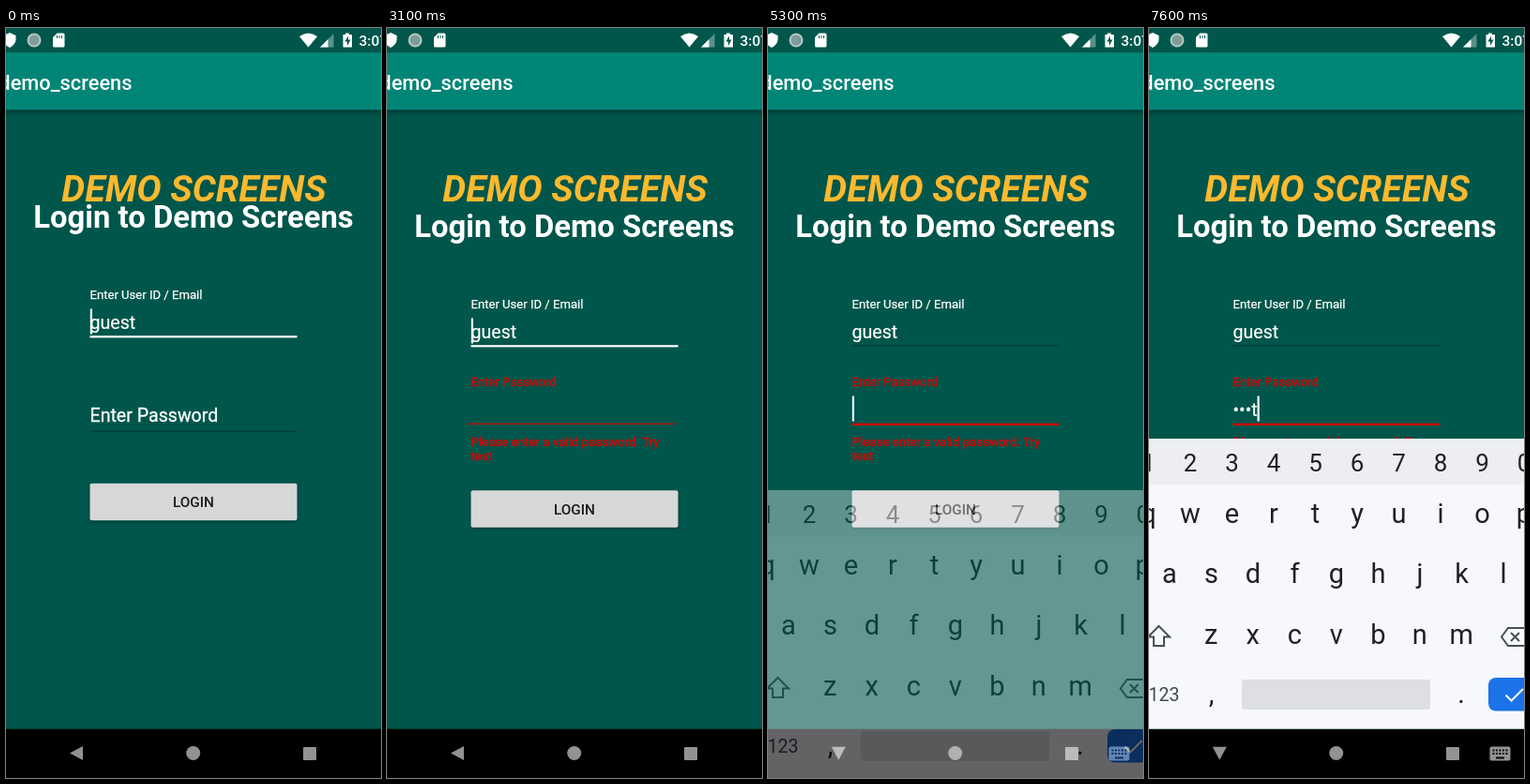
These frames come from a looping animation (400 px wide and 800 px high, 8 s). An HTML page:

```html
<!DOCTYPE html>
<html lang="en">
<head>
<meta charset="utf-8">
<title>Login form</title>
<style>
  html, body { margin: 0; width: 100%; height: 100%; overflow: hidden; background: #00564b; }
  svg { display: block; width: 400px; height: 800px; font-family: Roboto, sans-serif; }
  text { fill: #fff; white-space: pre; }
  .mid { text-anchor: middle; }
  .label { font-size: 13.1px; stroke: #fff; stroke-width: .25px; }
  .input { font-size: 19.6px; stroke: #fff; stroke-width: .2px; }
  .error { font-size: 13.3px; fill: #d80606; stroke: #d80606; stroke-width: .4px; }
  #keys text { fill: #202124; text-anchor: middle; font-size: 29px; }
  #keys .digit { font-size: 26px; }
  #keys .mode { font-size: 19.5px; fill: #444a50; text-anchor: end; }
</style>
</head>
<body>
<svg viewBox="0 0 400 800">
  <defs>
    <linearGradient id="shade" x1="0" y1="0" x2="0" y2="1">
      <stop offset="0" stop-opacity=".28"/><stop offset="1" stop-opacity="0"/>
    </linearGradient>
    <clipPath id="btnClip"><rect x="89.500" y="485.700" width="221" height="39.500" rx="2"/></clipPath>
  </defs>

  <rect width="400" height="800" fill="#00564b"/>
  <rect y="26.200" width="400" height="61.100" fill="#008577"/>
  <rect y="87.300" width="400" height="8" fill="url(#shade)"/>

  <!-- status bar -->
  <g fill="#fff">
    <path d="M-3 8 4 5 10.500 8V12.500Q10 18 4 21-2 18-3 12.500Z"/>
    <circle cx="30" cy="13" r="6.500" fill="#7f9d98" stroke="#b4c6c3" stroke-width="2"/>
    <path d="M54.500 5.500H61Q62.500 5.500 62.500 7V19Q62.500 20.500 61 20.500H51.500Q50 20.500 50 19V10Z"/>
    <path d="M54.500 8v3M57 8v3M59.500 8v3" stroke="#00564b"/>
    <path d="M313 9Q322.500 2 332 9L322.500 20.500Z"/>
    <path d="M335 20.500 349.500 6V20.500Z" opacity=".35"/>
    <path d="M335 20.500 343.500 12V20.500Z"/>
    <path d="M362 5.500h4V7h3V20.500H359.500V7H362Z"/>
    <path d="M365 8.500 361.500 14.500H364V19L367.500 12.500H365Z" fill="#00564b"/>
  </g>
  <text x="376.500" y="19" font-size="15.500" font-weight="500">3:07</text>
  <text x="134.500" y="65.500" font-size="21.800" font-weight="500" text-anchor="end">demo_screens</text>

  <text class="mid" x="200.500" y="184.500" font-size="39.400" font-weight="700" font-style="italic" style="fill:#fdb92e">DEMO SCREENS</text>

  <g id="upper">
    <text class="mid" x="200" y="212.500" font-size="32.800" font-weight="700">Login to Demo Screens</text>
    <text class="label" x="89.500" y="289">Enter User ID / Email</text>
    <text class="input" x="89.500" y="321">guest</text>
    <rect id="userLine" x="89.500" width="221"/>
    <rect id="userCaret" x="89.800" y="299.500" width="2.200" height="27" fill="#fff"/>
  </g>

  <text id="hint" x="89.500" stroke-width=".3">Enter Password</text>
  <g id="field">
    <rect id="passLine" x="89.500" width="221"/>
    <text id="pass" class="input" x="89.500" y="414"></text>
    <rect id="passCaret" y="392.500" width="2.200" height="27" fill="#fff"/>
  </g>
  <g id="error">
    <text class="error" x="89.500" y="445.500">Please enter a valid password. Try</text>
    <text class="error" x="89.500" y="461">test</text>
  </g>

  <g id="button">
    <rect id="btnFace" x="89.500" y="485.700" width="221" height="39.500" rx="2" fill="#d6d7d7"/>
    <g id="ripple" clip-path="url(#btnClip)">
      <rect x="89" y="485" width="222" height="41" fill-opacity=".045"/>
      <circle id="wave" cx="165" cy="499" fill="#304048" fill-opacity=".075"/>
    </g>
    <text class="mid" x="200" y="511" font-size="15.300" font-weight="500" style="fill:#1c1c1c">LOGIN</text>
  </g>

  <!-- navigation bar -->
  <rect y="747.700" width="400" height="53"/>
  <g fill="#929292">
    <path id="back" d="M68 773.500 82 766V781Z"/>
    <circle cx="199.700" cy="773.500" r="7.500"/>
    <rect x="317" y="767" width="14" height="14" rx="1"/>
    <g id="imeIcon">
      <rect x="363.500" y="766.500" width="22" height="15" rx="2"/>
      <path d="M366.500 770.500H383M366.500 774H383" stroke="#000" stroke-width="2" stroke-dasharray="2 1.500"/>
      <path d="M370 778.500h9" stroke="#000" stroke-width="2"/>
    </g>
  </g>

  <g id="keyboard">
    <rect y="438" width="400" height="309.700" fill="#f7f8fc"/>
    <rect y="438" width="400" height="49" fill="#eceef1"/>
    <rect x="99" y="695" width="201" height="32" rx="3" fill="#dddfe2"/>
    <rect x="362" y="693" width="60" height="35.500" rx="8" fill="#1a73e8"/>
    <g id="keys"><text class="mode" x="32.500" y="718">?123</text></g>
    <g fill="none" stroke="#4a4e53" stroke-width="2">
      <path d="M10.500 638 22 649.500H16V659H5V649.500H-1Z"/>
      <path d="M376 649.500 383 640H406V659H383ZM386 645l9 9M395 645l-9 9"/>
      <path d="M380.500 711.500 386.500 717.500 399 705" stroke="#fff"/>
    </g>
  </g>
</svg>
<script>
const LOOP = 8000, STEP = 100;
const SHIFT = 1958;                    // error shows and the form re-lays out
const SHAKE = { from: 2680, to: 3980, cycles: 5, size: 5.5 };
const FOCUS = 5000;                    // password field takes focus
const RED = '#d80606', DARK = '#003b34';

const $ = id => document.getElementById(id);
const clamp = v => Math.min(1, Math.max(0, v));
const mix = (a, b, p) => a + (b - a) * p;
const set = (id, attrs) => {
  for (const k in attrs) $(id).setAttribute(k, attrs[k]);
};
const show = (id, on) => set(id, { visibility: on ? 'visible' : 'hidden' });
const move = (id, x, y) => set(id, { transform: `translate(${x} ${y})` });
const within = (t, spans) => spans.some(([a, b]) => t >= a && t < b);

const userOn = [[0, 500], [1100, 1600], [2000, 2500], [3000, 3600], [4000, 4700]];
const passOn = [[FOCUS, 6100], [6600, LOOP]];
const typed = [[7600, '•••t'], [7400, '••s'], [7300, '•e'], [7200, 't']];
const keyboard = { 5300: [0.4, 55], 5400: [0.83, 15.5] };  // opacity, drop

const rows = [
  ['1234567890', -0.5, 473, 'digit'],
  ['qwertyuiop', -0.5, 528, ''],
  ['asdfghjkl', 22, 592, ''],
  ['zxcvbnm', 66.3, 657, '']
];
function addKey(ch, x, y, cls) {
  const key = document.createElementNS($('keys').namespaceURI, 'text');
  key.textContent = ch;
  key.setAttribute('x', x);
  key.setAttribute('y', y);
  key.setAttribute('class', cls);
  $('keys').append(key);
}
for (const [chars, x, y, cls] of rows)
  [...chars].forEach((ch, i) => addKey(ch, x + i * 44.5, y, cls));
addKey(',', 66.5, 720, '');
addKey('.', 333, 720, '');

function drawForm(t) {
  const shifted = t >= SHIFT, focused = t >= FOCUS;
  move('upper', 0, shifted ? 10 : 0);
  move('button', 0, shifted ? 7.5 : 0);

  set('userLine', focused
    ? { y: 328.3, height: 1.1, fill: DARK }
    : { y: 328.2, height: 2.2, fill: '#fff' });
  show('userCaret', within(t, userOn));

  const c = clamp((t - SHIFT) / 167), p = c * c * (3 - 2 * c);
  const ink = `rgb(${mix(255, 216, p * p)},${mix(255, 6, p * p)},${mix(255, 6, p * p)})`;
  set('hint', {
    y: shifted ? mix(412, 382, p) : 420,
    style: `font-size:${mix(19.6, 13.1, p)}px;fill:${ink};stroke:${ink}`
  });

  const s = (t - SHAKE.from) / (SHAKE.to - SHAKE.from);
  const dx = s > 0 && s < 1 ? SHAKE.size * Math.sin(2 * Math.PI * SHAKE.cycles * s) : 0;
  move('field', dx, 0);
  set('passLine', {
    y: shifted ? 421.6 : 429.6,
    height: focused ? 2.3 : 1.2,
    fill: shifted ? RED : DARK
  });

  const e = clamp((t - SHIFT) / 217);
  show('error', shifted);
  move('error', 0, -5.5 * (1 - e) ** 3);
}

function drawPassword(t) {
  const hit = typed.find(([at]) => t >= at);
  $('pass').textContent = hit ? hit[1] : '';
  const w = hit ? $('pass').getComputedTextLength() : 0;
  set('passCaret', { x: 89.8 + Math.max(0, w - 0.5) });
  show('passCaret', within(t, passOn));
}

function drawButton(t) {
  const pressed = t >= 1800 && t < 2300;
  $('btnFace').style.filter = pressed
    ? 'drop-shadow(0 3px 3px rgba(0,0,0,.4))'
    : 'drop-shadow(0 1.5px 1.5px rgba(0,0,0,.4))';
  show('ripple', t >= 1800 && t < 2600);
  set('ripple', { opacity: 1 - clamp((t - 2000) / 600) });
  set('wave', { r: t < 2000 ? 12 + Math.max(0, t - 1800) * 0.065 : 25 + (t - 2000) * 0.45 });
}

function drawSystem(t) {
  const ime = t >= 5100;
  set('back', { transform: ime ? 'rotate(-90 75.3 773.5)' : '' });
  show('imeIcon', ime);
  const [alpha, drop] = keyboard[t] || [t >= 5500 ? 1 : 0, 0];
  set('keyboard', { opacity: alpha });
  move('keyboard', 0, drop);
}

let start;
function frame(now) {
  start ??= now;
  const t = Math.floor(((now - start) % LOOP) / STEP) * STEP;
  drawForm(t);
  drawPassword(t);
  drawButton(t);
  drawSystem(t);
  requestAnimationFrame(frame);
}
requestAnimationFrame(frame);
</script>
</body>
</html>
```
